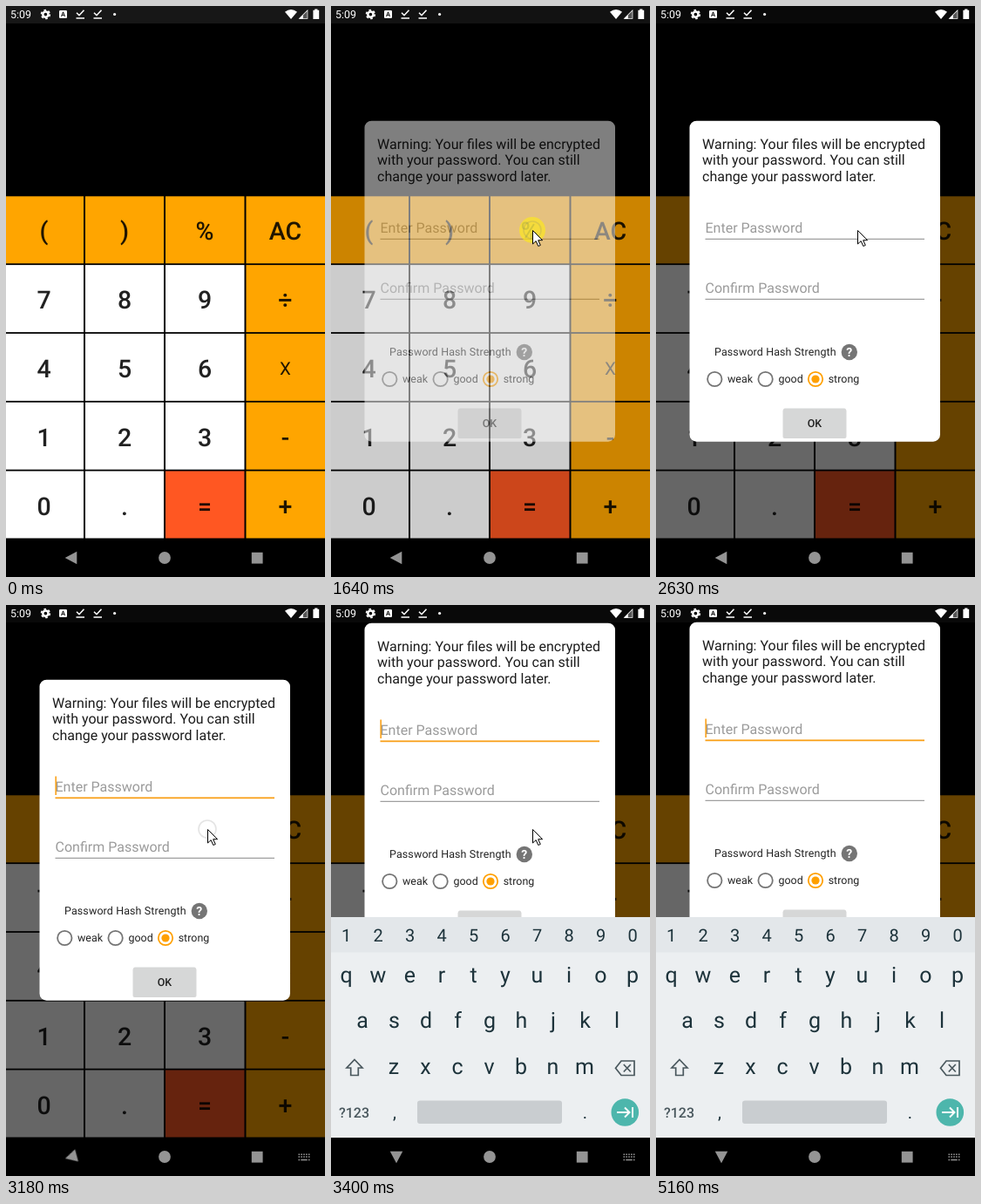
Write an HTML page that moves like this. It is 366 px wide and 655 px high and loops after 5380 ms.

```html
<!DOCTYPE html>
<html lang="en">
<head>
<meta charset="utf-8">
<title>Calculator password dialog</title>
<style>
  html, body { margin: 0; height: 100%; overflow: hidden; background: #000; }
  svg { display: block; width: 100vw; height: 100vh; }
  text { font-family: Roboto, sans-serif; text-rendering: geometricPrecision; white-space: pre; }
  .mid { text-anchor: middle; }
  .key { font-size: 28.5px; font-weight: 500; fill: rgba(0,0,0,.87); }
  .body { font-size: 16px; fill: #1c1c1c; }
  .hint { font-size: 16px; fill: #9b9b9b; }
  .small { font-size: 12.46px; fill: #222; }
  .kb { fill: #1d333b; }
</style>
</head>
<body>
<svg id="stage" viewBox="0 0 366 655" preserveAspectRatio="none">
  <rect width="366" height="655"/>
  <rect width="366" height="20" fill="#171717"/>
  <g id="calc"></g>
  <rect id="dim" width="366" height="611"/>

  <g id="dialog">
    <rect x="38.5" y="131.7" width="287.5" height="368" rx="8" fill="#fff"/>
    <g id="message"></g>
    <text class="hint" x="56.5" y="260">Enter Password</text>
    <text class="hint" x="56.5" y="329">Confirm Password</text>
    <path d="M56.5 336.3H308" stroke="#888"/>
    <path id="line" d="M56.5 267.3H308" stroke="#888"/>
    <g id="focus" fill="#f9a11b">
      <rect x="56.5" y="266.4" width="251.5" height="1.8"/>
      <rect id="caret" x="56.4" y="242.5" width="1.6" height="21.5"/>
    </g>
    <text class="small" x="67" y="400.5" letter-spacing=".12">Password Hash Strength</text>
    <circle cx="221.8" cy="397" r="9.2" fill="#757575"/>
    <text class="mid" x="221.8" y="402" font-size="14" font-weight="700" fill="#fff">?</text>
    <g id="radios" fill="none" stroke-width="1.8"></g>
    <rect x="145.5" y="462.5" width="73" height="33.5" rx="2" fill="#000" opacity=".16"/>
    <rect x="146" y="461.5" width="72" height="33" rx="2" fill="#d6d7d7"/>
    <text class="small mid" x="182" y="483" font-weight="500">OK</text>
  </g>

  <g id="board">
    <rect y="358" width="366" height="253.5" fill="#eceff1"/>
    <rect y="358" width="366" height="40.5" fill="#e3e7ea"/>
    <rect x="99" y="568.5" width="166" height="26.5" rx="3" fill="#c9cdd0"/>
    <g id="letters"></g>
    <text class="mid" x="26.5" y="587.5" font-size="16" font-weight="500" fill="#4a585e">?123</text>
    <g fill="none" stroke="#4a585e" stroke-width="1.7">
      <path d="M27 521.5L36 531H31.3V539.5H22.7V531H18Z"/>
      <path d="M333 523H348V539.5H333L326.5 531.2ZM335.8 527L343.8 535.5M343.8 527L335.8 535.5"/>
    </g>
    <circle cx="337.3" cy="582" r="15.8" fill="#4db6ac"/>
    <path d="M328 582H342M337 576.5L342.5 582L337 587.5M346 576V588" fill="none" stroke="#fff" stroke-width="1.9"/>
  </g>

  <g id="status" fill="#fff">
    <text x="5" y="14.3" font-size="12.46">5:09</text>
    <circle cx="45.4" cy="9.6" r="3.1" fill="none" stroke="#fff" stroke-width="2.5"/>
    <circle cx="45.4" cy="9.6" r="4.9" fill="none" stroke="#fff" stroke-width="1.7" stroke-dasharray="2.6 2.53"/>
    <rect x="61" y="5" width="9" height="9" rx="1.2"/>
    <text class="mid" x="65.5" y="12.2" font-size="7.5" font-weight="700" fill="#171717">A</text>
    <path id="tick" d="M81 7.7L84 10.7L89.5 4.8M80.5 14H90" fill="none" stroke="#fff" stroke-width="1.6"/>
    <use href="#tick" x="20"/>
    <circle cx="124.6" cy="9.5" r="1.6"/>
    <path d="M320 6.8Q327 1.4 334 6.8L327 15Z"/>
    <path d="M346.3 4V14.7H335.6Z"/>
    <path d="M345.6 5.8V14H337.4Z" fill="#555"/>
    <path d="M340.8 10.2V14.7H336.3Z"/>
    <path d="M354.2 3.6H357.4V4.8H359.2V15H352.4V4.8H354.2Z"/>
  </g>

  <g id="nav" fill="#949494">
    <rect y="611" width="366" height="44" fill="#000"/>
    <g transform="translate(75 633)"><path id="back" d="M-7.3 0L6.3 -7.3V7.3Z"/></g>
    <circle cx="182" cy="633" r="6.9"/>
    <rect x="281.8" y="626.8" width="12.8" height="12.8"/>
    <g id="kbIcon" fill="none" stroke="#949494">
      <path d="M335.5 630.3H348.5M335.5 633H348.5" stroke-width="1.6" stroke-dasharray="1.6 1.25"/>
      <path d="M335.5 636.5H348.5" stroke-width="1.6" stroke-dasharray="1.6 1.2 7.4 1.2"/>
    </g>
  </g>

  <g id="pointer">
    <circle id="glow" r="15" fill="rgb(255,235,20)" fill-opacity=".62"/>
    <circle id="ring" r="10" fill="none" stroke="#777" stroke-opacity=".2" stroke-width="1.6"/>
    <path d="M.5 .5V16L4.2 12.6L6.8 18.5L9.3 17.4L6.7 11.7H11.6Z" fill="#fff" stroke="#000"/>
  </g>
</svg>
<script>
const LOOP = 5380;
const $ = id => document.getElementById(id);

function add(parent, tag, attrs, label) {
  const el = document.createElementNS('http://www.w3.org/2000/svg', tag);
  for (const k in attrs) el.setAttribute(k, attrs[k]);
  if (label) el.textContent = label;
  return parent.appendChild(el);
}

// Calculator keys
const cols = [[0, 89], [91, 181], [183, 273.5], [275.5, 366]];
const centers = [43.5, 136, 228, 320.5];
const rows = ['( ) % AC', '7 8 9 ÷', '4 5 6 x', '1 2 3 -', '0 . = +'];
rows.forEach((row, r) => row.split(' ').forEach((label, c) => {
  const y = 218.3 + r * 78.8, [left, right] = cols[c];
  const fill = label === '=' ? '#ff5722' : r === 0 || c === 3 ? '#ffa500' : '#fff';
  add($('calc'), 'rect', { x: left, y, width: right - left, height: 77, fill });
  const text = { class: 'key mid', x: centers[c], y: y + 50 };
  if (label === 'x') {
    text.y = y + 47.2;
    text.style = 'font-size:20.5px;font-weight:400';
  }
  add($('calc'), 'text', text, label === 'x' ? 'X' : label);
}));

// Dialog message and strength options
['Warning: Your files will be encrypted', 'with your password. You can still', 'change your password later.']
  .forEach((line, i) => add($('message'), 'text', { class: 'body', x: 53, y: 163.7 + i * 18.75 }, line));

[['weak', 67.3, 82], ['good', 125.6, 140.5], ['strong', 183, 197.7]].forEach(([label, cx, x], i) => {
  const on = i === 2;
  add($('radios'), 'circle', { cx, cy: 428, r: 8.2, stroke: on ? '#ffa000' : '#757575' });
  if (on) add($('radios'), 'circle', { cx, cy: 428, r: 4.6, fill: '#ffa000' });
  add($('radios'), 'text', { class: 'small', x, y: 432.4 }, label);
});

// Soft keyboard
[['1234567890', 17.5, 386, 20], ['qwertyuiop', 17.5, 432.5, 25], ['asdfghjkl', 36, 485, 25],
 ['zxcvbnm', 72, 538, 25], [',', 73, 589, 20], ['.', 291.5, 589, 20]].forEach(([chars, x, y, size]) =>
  [...chars].forEach((ch, i) =>
    add($('letters'), 'text', { class: 'kb mid', x: x + i * 36.5, y, 'font-size': size }, ch)));

// Holds each value until the next listed time
function hold(id, prop, steps) {
  const frames = steps.map(([ms, value]) => ({ offset: ms / LOOP, [prop]: value, easing: 'steps(1, end)' }));
  frames.push({ offset: 1, [prop]: steps[steps.length - 1][1] });
  $(id).animate(frames, { duration: LOOP, iterations: Infinity });
}
const move = (id, steps) => hold(id, 'transform', steps.map(([ms, x, y]) => [ms, `translate(${x}px, ${y}px)`]));
const turn = (id, steps) => hold(id, 'transform', steps.map(([ms, a]) => [ms, `rotate(${a}deg)`]));
const fade = (id, steps) => hold(id, 'opacity', steps);

move('pointer', [[0, 295, 568], [440, 276, 468], [540, 247, 325], [650, 231, 239], [870, 231, 257],
  [4400, 243, 330], [4500, 281, 505], [4610, 312, 633]]);
fade('pointer', [[0, 0], [330, 1], [4710, 0]]);
fade('glow', [[0, 0], [1090, 1], [2310, 0], [2960, 1], [3070, 0]]);
fade('ring', [[0, 0], [1090, 1], [2430, .6], [2630, 0], [2960, 1], [3280, .5], [3400, 0]]);

fade('dim', [[0, 0], [1640, .2], [1760, .47], [1860, .6]]);
fade('dialog', [[0, 0], [1640, .5], [1760, 1]]);
move('dialog', [[0, 0, 0], [3180, 0, -46], [3280, 0, -94], [3400, 0, -111], [3520, 0, -112]]);
fade('line', [[0, 1], [3070, 0]]);
fade('focus', [[0, 0], [3070, 1]]);
fade('caret', [[0, 1], [3640, 0], [4170, 1], [4710, 0], [5160, 1]]);

move('board', [[0, 0, 254], [3280, 0, 60], [3400, 0, 0]]);
fade('board', [[0, 0], [3280, 1]]);
turn('back', [[0, 0], [3180, -15], [3280, -65], [3400, -90]]);
fade('kbIcon', [[0, 0], [3180, 1]]);
</script>
</body>
</html>
```
